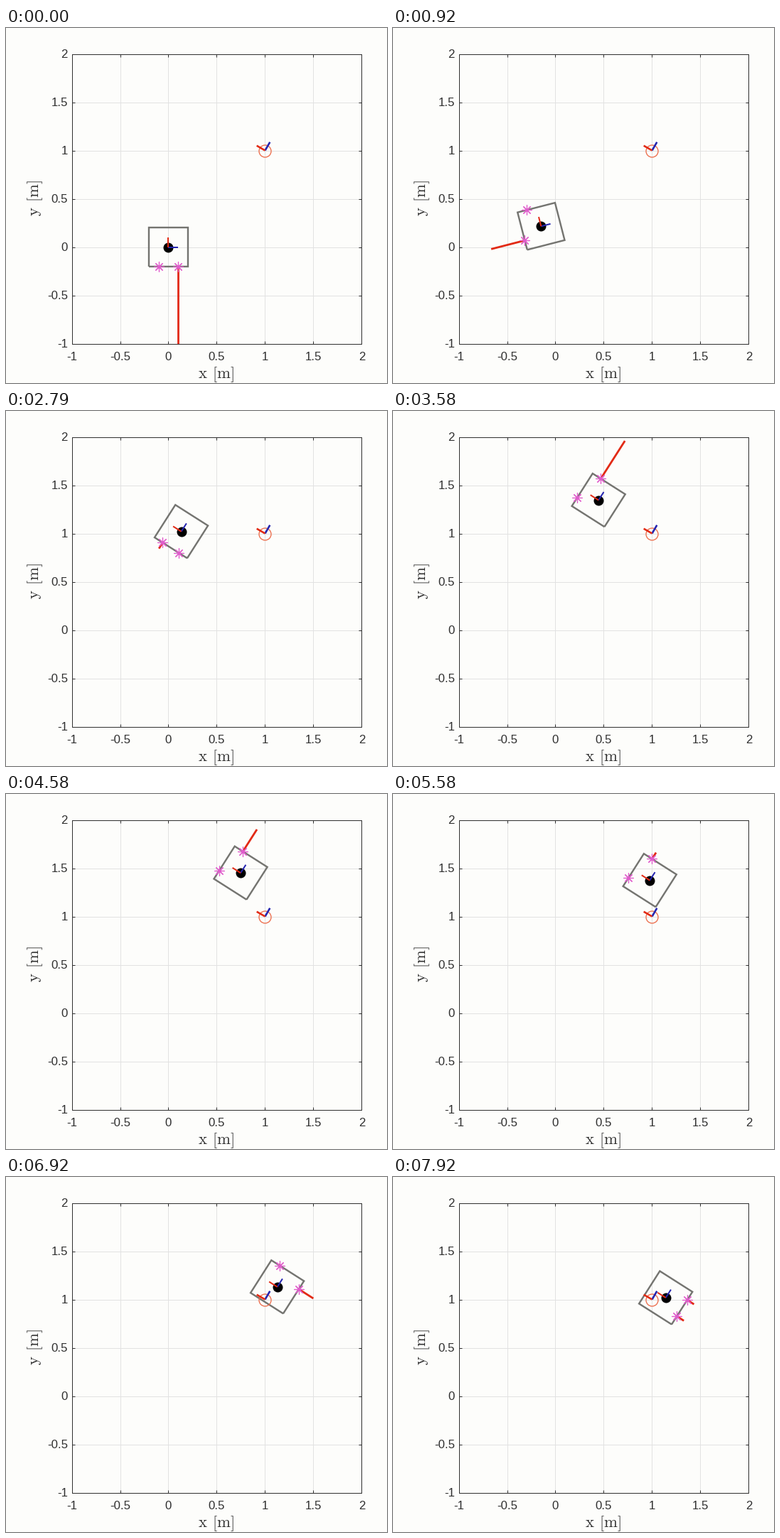
Recreate the animation shown at these times as a matplotlib script. Size 536 by 500 pixels, loop 8 s.

```python
import numpy as np
import matplotlib.pyplot as plt
from matplotlib.animation import FuncAnimation

W, H, DPI = 536, 500, 100
PX = 72 / DPI                       # points per pixel
LEFT, RIGHT, TOP, BOTTOM = 92.5, 500.5, 36.5, 444.5
STEP_MS, LOOP_MS = 50, 8000
POSE_STARTS = (0, 80, 210, 290, 420)   # pose changes within each 500 ms

PAPER, GRID, INK = "#fdfdfb", "#e2e2e2", "#303030"
RED, BLUE, PINK = "#e22a14", "#2424b0", "#e05ccc"
ORANGE, GRAY = "#ec6a48", "#747470"

plt.rcParams["font.family"] = "Liberation Sans"
plt.rcParams["mathtext.fontset"] = "cm"

# waypoints of the robot: time, x, y
TIMES, *COORDS = np.array([
    (0.0, 0, 0), (0.9, -0.148, 0.215), (2.1, -0.09, 0.686), (3.6, 0.446, 1.345),
    (5.6, 0.976, 1.374), (6.9, 1.126, 1.13), (7.9, 1.141, 1.018),
]).T
SPOTS = np.array(COORDS).T
SPEEDS = np.gradient(SPOTS, TIMES, axis=0)
SPEEDS[0] = 0                       # starts at rest

# nozzles clockwise round the hull, two per side
NOZZLES = [(c * a + s * 0.2, s * a - c * 0.2)
           for c, s in ((1, 0), (0, -1), (-1, 0), (0, 1)) for a in (0.1, -0.1)]
# first pose of each burst, main and helper nozzle
BURSTS = [(0, 0, 1), (5, 2, 4), (14, 3, 2), (30, 6, 4), (60, 0, 6), (73, 0, 1)]
BURST_ENDS = [b[0] for b in BURSTS[1:]] + [80]


def heading(t):
    """Turn to 57.5 degrees with a smooth start and stop."""
    u = min(t / 2.5, 1)
    return 57.5 * u ** 3 * (10 - 15 * u + 6 * u * u)


def position(t):
    """Cubic Hermite curve through the waypoints."""
    i = min(np.searchsorted(TIMES, t, side="right") - 1, len(TIMES) - 2)
    span = TIMES[i + 1] - TIMES[i]
    u = (t - TIMES[i]) / span
    return ((1 + 2 * u) * (1 - u) ** 2 * SPOTS[i] + u * u * (3 - 2 * u) * SPOTS[i + 1]
            + span * u * (1 - u) * ((1 - u) * SPEEDS[i] - u * SPEEDS[i + 1]))


def burst(n):
    """Nozzles in use and the length of their jets."""
    i = sum(n >= end for end in BURST_ENDS)
    start, main, helper = BURSTS[i]
    fade = (BURST_ENDS[i] - n) / (BURST_ENDS[i] - start)
    power = 0.58 + 0.4 * np.exp(-n / 5)
    return (NOZZLES[main], power * fade), (NOZZLES[helper], 0.1 * (n / 80) ** 12)


def to_world(points, xy, deg):
    c, s = np.cos(np.radians(deg)), np.sin(np.radians(deg))
    return np.asarray(points) @ np.array([(c, s), (-s, c)]) + xy


def outward(p):
    """Unit normal of the hull side that holds p."""
    return np.where(np.abs(p) > 0.15, np.sign(p), 0)


fig = plt.figure(figsize=(W / DPI, H / DPI), dpi=DPI, facecolor=PAPER)
ax = fig.add_axes([LEFT / W, 1 - BOTTOM / H, (RIGHT - LEFT) / W, (BOTTOM - TOP) / H],
                  facecolor=PAPER)
ticks = np.arange(-1, 2.1, 0.5)
ax.set(xlim=(-1, 2), ylim=(-1, 2), xticks=ticks, yticks=ticks)
ax.set_axisbelow(True)
ax.grid(color=GRID, lw=1 * PX)
ax.tick_params(direction="in", top=True, right=True, length=4 * PX, width=1 * PX,
               color=INK, labelbottom=False, labelleft=False)
for spine in ax.spines.values():
    spine.set(color=INK, linewidth=1 * PX)


def label(x, y, text, size=16.7, **kw):
    kw = dict(ha="center", va="baseline") | kw
    fig.text(x / W, 1 - y / H, text, fontsize=size * PX, color=INK, **kw)


for v in ticks:
    f = (v + 1) / 3
    label(LEFT + f * (RIGHT - LEFT), 468, f"{v:g}")
    label(87, BOTTOM - f * (BOTTOM - TOP) + 6, f"{v:g}", ha="right")
label(295.5, 493, r"$\mathrm{x\ \hspace{0.1}[m]}$", 22.7)
label(41, 239.5, r"$\mathrm{y\ \hspace{0.1}[m]}$", 22.7, va="center", rotation=90)


def line(color, width, z):
    return ax.plot([], [], color=color, lw=width * PX, zorder=z,
                   solid_capstyle="butt", solid_joinstyle="miter")[0]


def dots(shape, size, z, **kw):
    return ax.plot([], [], marker=shape, ms=size * PX, ls="none", zorder=z, **kw)[0]


AXES = [(0.1, 0), (0, 0), (0, 0.1)]
HULL = 0.2 * np.array([(-1, -1), (1, -1), (1, 1), (-1, 1), (-1, -1)])


def draw_axes(lines, xy, deg):
    pts = to_world(AXES, xy, deg)
    lines[0].set_data(*pts[:2].T)
    lines[1].set_data(*pts[1:].T)


goal_axes = line(BLUE, 2.6, 8), line(RED, 2.6, 8)
draw_axes(goal_axes, (1, 1), 60)
goal = dots("o", 17, 7, mfc="none", mec=ORANGE, mew=1.3 * PX)
goal.set_data([1], [1])

hull = line(GRAY, 2.4, 3)
jets = [line(RED, 2.8, 4) for _ in range(2)]
stars = dots((8, 2, 0), 14, 5, mec=PINK, mew=1.2 * PX)
body = dots("o", 14, 5, mfc="black", mec="none")
body_axes = line(BLUE, 2, 6), line(RED, 2, 6)


def draw(k):
    t = k * STEP_MS
    n = 5 * (t // 500) + sum(s < t % 500 + STEP_MS for s in POSE_STARTS) - 1
    xy, deg = position(n / 10), heading(n / 10)
    hull.set_data(*to_world(HULL, xy, deg).T)
    body.set_data([xy[0]], [xy[1]])
    draw_axes(body_axes, xy, deg)

    active = burst(n)
    for jet, (p, length) in zip(jets, active):
        jet.set_data(*to_world([p, p + outward(p) * length], xy, deg).T)
    stars.set_data(*to_world([p for p, _ in active], xy, deg).T)
    return [hull, body, stars, *jets, *body_axes]


anim = FuncAnimation(fig, draw, frames=LOOP_MS // STEP_MS, interval=STEP_MS,
                     repeat=True, repeat_delay=0)
plt.show()
```
